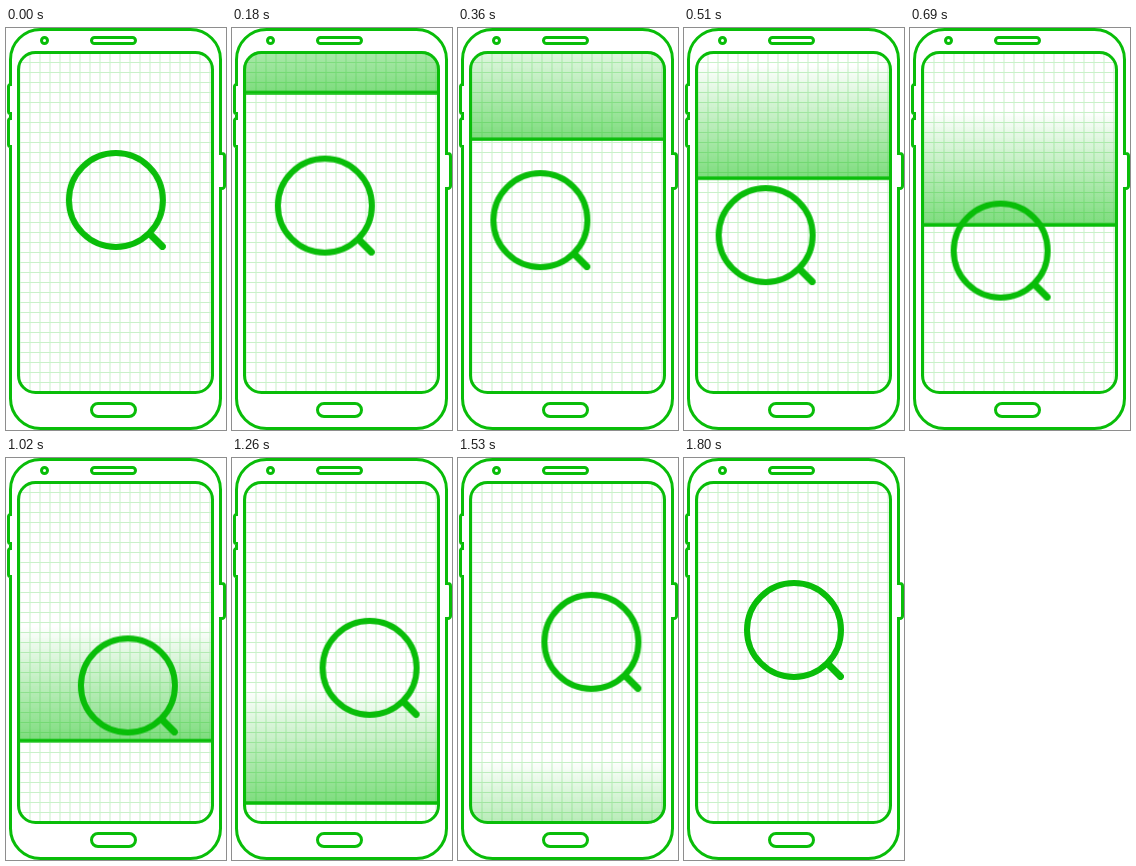
These frames come from a looping animation (220x402 px, 1.83 s). An HTML page:

```html
<!DOCTYPE html>
<html lang="en">
<head>
<meta charset="utf-8">
<title>Phone scan</title>
<style>
  html, body { margin: 0; width: 100%; height: 100%; overflow: hidden; background: #fff; }
  svg { display: block; width: 220px; height: 402px; }
  .line { fill: none; stroke: #09bd09; stroke-width: 3; }
  .lens { fill: none; stroke: #09bd09; stroke-width: 6; stroke-linecap: round; }
  .band, .orbit, .upright { animation: 1830ms linear infinite; }
  .band { animation-name: sweep; }
  .orbit { animation-name: orbit; transform-origin: 110px 201px; }
  .upright { animation-name: upright; transform-origin: 110px 172px; }

  /* Motion takes 1800 ms, then rests for 30 ms. */
  @keyframes sweep {
    0% { transform: translateY(17.5px); }
    98.361%, 100% { transform: translateY(485px); }
  }
  @keyframes orbit {
    0% { transform: rotate(0deg); }
    98.361%, 100% { transform: rotate(-360deg); }
  }
  @keyframes upright {
    0% { transform: rotate(0deg); }
    98.361%, 100% { transform: rotate(360deg); }
  }
</style>
</head>
<body>
<svg viewBox="0 0 220 402">
  <defs>
    <pattern id="grid" x="13.5" y="24" width="10" height="10" patternUnits="userSpaceOnUse">
      <path d="M0 0H10V1H1V10H0Z" fill="#09bd09" fill-opacity=".22"/>
    </pattern>
    <linearGradient id="glow" x1="0" y1="0" x2="0" y2="1">
      <stop offset="0" stop-color="#09bd09" stop-opacity="0"/>
      <stop offset="1" stop-color="#09bd09" stop-opacity=".53"/>
    </linearGradient>
    <clipPath id="screen"><rect x="11" y="23" width="197" height="343" rx="18.5"/></clipPath>
  </defs>

  <g clip-path="url(#screen)">
    <rect x="11" y="23" width="197" height="343" fill="url(#grid)"/>
    <g class="band">
      <rect x="11" y="-114" width="197" height="114" fill="url(#glow)"/>
      <rect x="11" y="-1.75" width="197" height="3.5" fill="#09bd09"/>
    </g>
  </g>

  <g class="line">
    <path d="M34.5 1.5H184.5A30 30 0 0 1 214.5 31.5V125.5H216a2.5 2.5 0 0 1 2.5 2.5V158a2.5 2.5 0 0 1-2.5 2.5H214.5V370.5A30 30 0 0 1 184.5 400.5H34.5A30 30 0 0 1 4.5 370.5V118.5a2 2 0 0 1-2-2V92.5a2 2 0 0 1 2-2V85.5a2 2 0 0 1-2-2V58.5a2 2 0 0 1 2-2V31.5A30 30 0 0 1 34.5 1.5Z"/>
    <rect x="12.5" y="24.5" width="194" height="340" rx="17"/>
    <circle cx="38.5" cy="12.5" r="3"/>
    <rect x="85.5" y="9.5" width="44" height="6" rx="3"/>
    <rect x="85.5" y="375.5" width="44" height="13" rx="6.5"/>
  </g>

  <g class="orbit">
    <g class="upright lens">
      <circle cx="110" cy="172" r="47"/>
      <path d="M144 206L156.5 218.5" stroke-width="7"/>
    </g>
  </g>
</svg>
</body>
</html>
```
